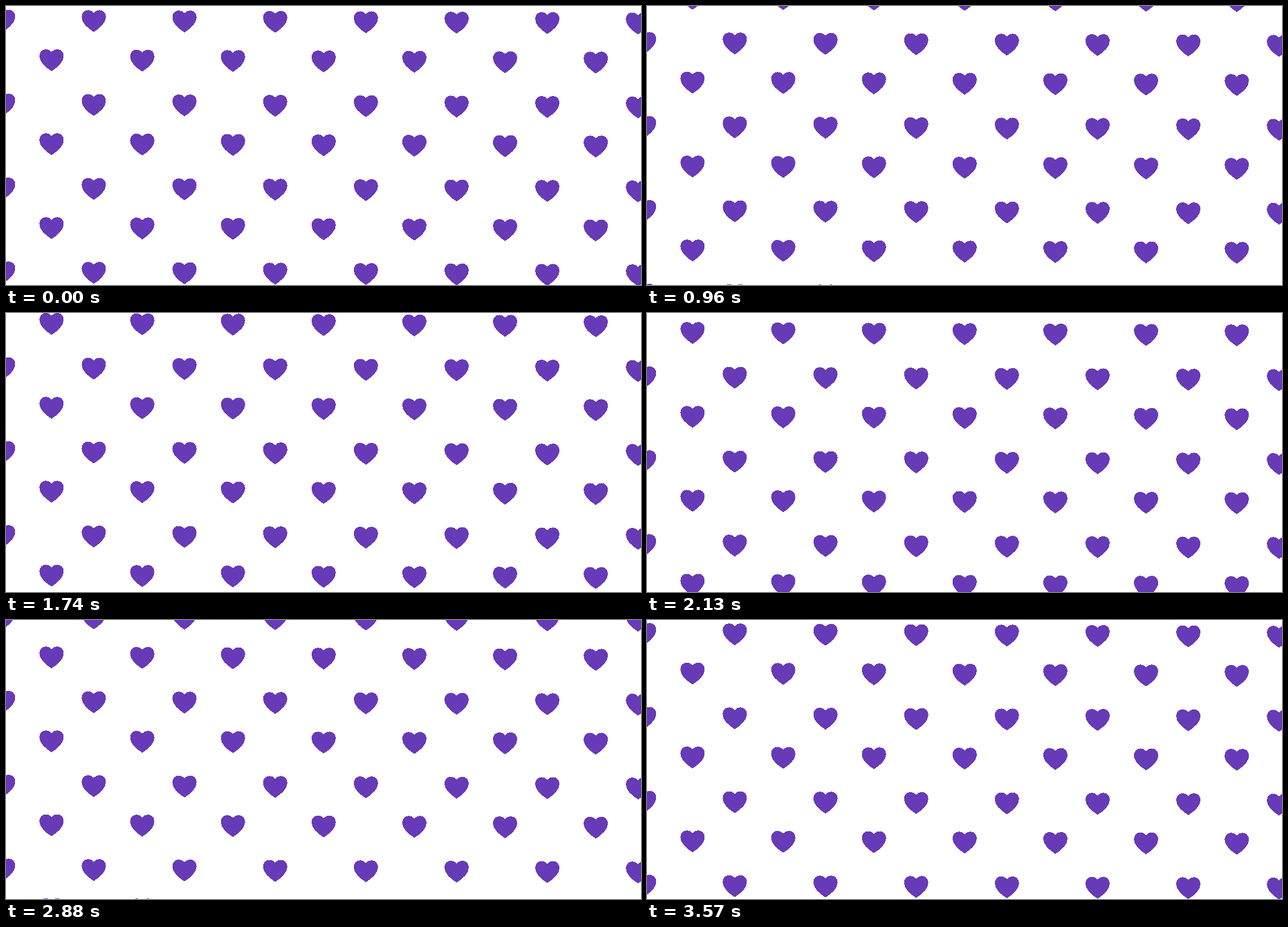
These frames come from a looping animation (1128 px wide and 496 px high, 3.6 s). An HTML page:

```html
<!DOCTYPE html>
<html lang="en">
<head>
<meta charset="utf-8">
<title>Falling hearts</title>
<style>
  html, body { margin: 0; width: 100%; height: 100%; overflow: hidden; background: #fff; }
  svg { display: block; }
</style>
</head>
<body>
<svg width="1128" height="496" viewBox="0 0 1128 496" shape-rendering="crispEdges">
  <defs>
    <!-- origin at the top centre of the heart -->
    <path id="heart" fill="#673ab7"
      d="M0 4.8C-2.8 1.6-6.3 0-10 0C-16.6 0-21.6 5-21.6 12.2C-21.6 22.2-12 31.4 0 39C12 31.4 21.6 22.2 21.6 12.2C21.6 5 16.6 0 10 0C6.3 0 2.8 1.6 0 4.8z"/>
  </defs>
  <g id="field"></g>
</svg>
<script>
  const LOOP = 3600, STEP = 30;
  const COL = 161.13, ROW = 149.2, SLOPE = 0.7;
  const field = document.getElementById("field");

  function addRow(x, y, count) {
    for (let i = 0; i < count; i++) {
      const use = document.createElementNS("http://www.w3.org/2000/svg", "use");
      use.setAttribute("href", "#heart");
      use.setAttribute("x", x + i * COL);
      use.setAttribute("y", y + i * SLOPE);
      field.appendChild(use);
    }
  }

  for (let r = -1; r < 4; r++) {
    addRow(-5.2, 6.6 + r * ROW, 8);
    addRow(80.9, 76.9 + r * ROW, 7);
  }

  function draw(ms) {
    const t = Math.floor((ms % LOOP) / STEP) * STEP;
    field.setAttribute("transform", `translate(0 ${ROW * t / LOOP})`);
  }

  let start = null;
  function tick(now) {
    if (start === null) start = now;
    draw(now - start);
    requestAnimationFrame(tick);
  }
  draw(0);
  requestAnimationFrame(tick);
</script>
</body>
</html>
```
